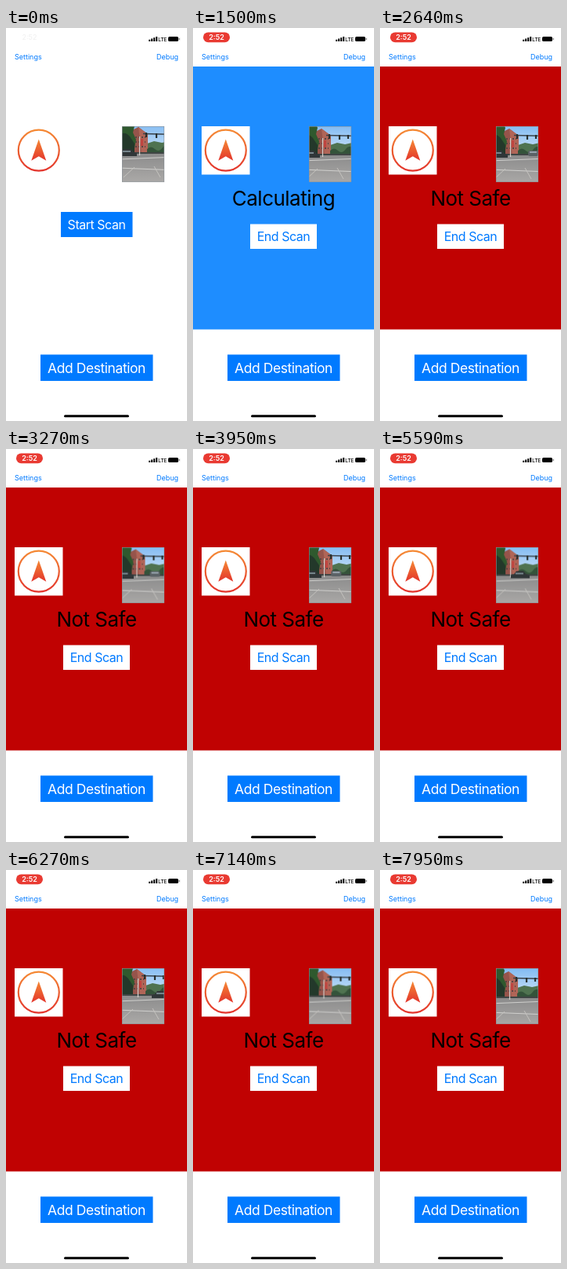
Write an HTML page that moves like this. It is 231 px wide and 500 px high and loops after 8000 ms.

```html
<!DOCTYPE html>
<html lang="en">
<head>
<meta charset="utf-8">
<title>Scan screen</title>
<style>
html, body { margin: 0; width: 100%; height: 100%; overflow: hidden; background: #fff; }
svg { display: block; width: 231px; height: 500px; font-family: Inter, Roboto, sans-serif; }
.mid { text-anchor: middle; }
.link, .end { fill: #007aff; }
.link { font-size: 9px; }
.button { fill: #007aff; }
.action { font-size: 16px; letter-spacing: -.03em; }
.state { font-size: 26px; letter-spacing: -.02em; }

.idle, .calculating, .unsafe, .scan, .pill, .camera, .car, .bus {
  animation: 8s linear infinite;
}
.idle { animation-name: idle; animation-timing-function: step-end; }
.scan { animation-name: scan; animation-timing-function: step-end; }
.calculating { animation-name: calculating; animation-timing-function: step-end; }
.unsafe { animation-name: unsafe; animation-timing-function: step-end; }
.pill { animation-name: pill; }
.camera { animation-name: camera; animation-timing-function: ease-in-out; }
.car { animation-name: car; }
.bus { animation-name: bus; }

@keyframes idle { 0% { opacity: 1 } 13%, 100% { opacity: 0 } }
@keyframes scan { 0% { opacity: 0 } 13%, 100% { opacity: 1 } }
@keyframes calculating { 0% { opacity: 0 } 13% { opacity: 1 } 25.5%, 100% { opacity: 0 } }
@keyframes unsafe { 0% { opacity: 0 } 25.5%, 100% { opacity: 1 } }
@keyframes pill { 0%, .7% { opacity: 0 } 4%, 100% { opacity: 1 } }
@keyframes camera {
  0% { transform: translate(5px, -2px) }
  19% { transform: translate(0, 0) }
  33% { transform: translate(1px, 0) }
  49% { transform: translate(2px, -1px) }
  61% { transform: translate(-1px, 1px) }
  78% { transform: translate(3px, -2px) }
  100% { transform: translate(0, 1px) }
}
@keyframes car {
  0%, 54% { transform: translateX(-34px) }
  61% { transform: translateX(-24px) }
  78% { transform: translateX(10px) }
  90%, 100% { transform: translateX(40px) }
}
@keyframes bus {
  0%, 24% { transform: translateX(32px) }
  33% { transform: translateX(16px) }
  49% { transform: translateX(4px) }
  60%, 100% { transform: translateX(-45px) }
}
</style>
</head>
<body>
<svg viewBox="0 0 231 500">
  <defs>
    <linearGradient id="ember" x1="0" y1="0" x2="0" y2="1">
      <stop offset="0" stop-color="#f58a35"/>
      <stop offset="1" stop-color="#e3342c"/>
    </linearGradient>
    <linearGradient id="sky" x1="0" y1="0" x2="0" y2="1">
      <stop offset="0" stop-color="#76b4f2"/>
      <stop offset="1" stop-color="#dcecf8"/>
    </linearGradient>
    <linearGradient id="road" x1="0" y1="0" x2="0" y2="1">
      <stop offset="0" stop-color="#8c8c8c"/>
      <stop offset="1" stop-color="#b0aeac"/>
    </linearGradient>
    <clipPath id="lens"><rect x="148" y="125" width="54" height="71"/></clipPath>
  </defs>

  <rect width="231" height="500" fill="#fff"/>

  <!-- Status bar -->
  <text class="mid" x="30" y="15.3" font-size="9" fill="#f0f0f0">2:52</text>
  <g class="pill">
    <rect x="13" y="5.5" width="34" height="12.7" rx="6.3" fill="#e93a32"/>
    <text class="mid" x="30" y="15.3" font-size="9" font-weight="600" fill="#fff">2:52</text>
  </g>
  <path d="M183.2 17v-2.3M186.2 17v-3.4M189.2 17v-4.7M192.2 17v-6" stroke="#000" stroke-width="2"/>
  <text x="194.3" y="16.9" font-size="6.6" font-weight="500" letter-spacing="-.2">LTE</text>
  <rect x="207" y="10.9" width="13" height="6.2" rx="1.7" fill="#000"/>
  <rect x="220.7" y="12.8" width="1.2" height="2.4" rx=".6" fill="#777"/>

  <text class="link" x="11" y="40.2">Settings</text>
  <text class="link" x="220" y="40.2" text-anchor="end">Debug</text>

  <!-- Scan panel -->
  <g class="calculating">
    <rect y="49" width="231" height="334.5" fill="#1e8dff"/>
    <text class="state mid" x="115.5" y="226">Calculating</text>
  </g>
  <g class="unsafe">
    <rect y="49" width="231" height="334.5" fill="#c00202"/>
    <text class="state mid" x="115.5" y="226">Not Safe</text>
  </g>
  <g class="idle">
    <rect class="button" x="70" y="234" width="91.5" height="32"/>
    <text class="action mid" x="115.5" y="256" fill="#fff">Start Scan</text>
  </g>
  <g class="scan">
    <rect x="11" y="125" width="61.5" height="61.5" fill="#fff"/>
    <rect x="73" y="249.5" width="85" height="31.5" fill="#fff"/>
    <text class="action end mid" x="115.5" y="271.3">End Scan</text>
  </g>

  <!-- Direction dial -->
  <circle cx="41.8" cy="155.6" r="26" fill="none" stroke="url(#ember)" stroke-width="2.2"/>
  <path d="M41.8 141.5L51.3 168.8L41.8 163.2L32.3 168.8Z" fill="url(#ember)"/>

  <!-- Camera view -->
  <g clip-path="url(#lens)">
    <g class="camera">
      <rect x="138" y="118" width="75" height="50" fill="url(#sky)"/>
      <path d="M175 149l9-3 10 2 18-4v20h-37z" fill="#4f7350"/>
      <path d="M152 134l12-6 12 9v25h-24z" fill="#96544b"/>
      <path d="M164 128l12 9v25h-8z" fill="#b06557"/>
      <path d="M156 141h17M156 147h17M156 153h17" stroke="#5b4544" stroke-width="2" stroke-dasharray="2 2"/>
      <path d="M138 118h17l4 9-2 8 4 9-3 17h-20z" fill="#2f592e"/>
      <path d="M138 139q8-7 15 1l6 9v13h-21z" fill="#23382a"/>
      <path d="M175 156q5-5 10 0t10-2 18 1v9h-38z" fill="#34533a"/>
      <path d="M138 160h75v3h-75z" fill="#3f4544"/>
      <rect x="138" y="162" width="75" height="42" fill="url(#road)"/>
      <path d="M138 169l75-3M138 180l75 3" stroke="#d0d0ce" stroke-width="1.2"/>
      <path d="M145 192l14-13M192 192l-8-14" stroke="#c5c3bf" stroke-width="1"/>
      <path d="M170 136.5l43 1" stroke="#39424a" stroke-width="1.3"/>
      <path d="M174 135v6M187 136v6M198 136v5" stroke="#28302e" stroke-width="2.2"/>
      <path d="M165.5 140v24" stroke="#d6d2ce" stroke-width="1.2"/>
      <rect x="167" y="143" width="3" height="9" fill="#c04540"/>
      <g class="bus">
        <rect x="172" y="156" width="13" height="7" rx="2" fill="#5b6266"/>
        <path d="M174 158h9" stroke="#a9b7c2" stroke-width="1.5"/>
      </g>
      <g class="car">
        <path d="M172 165v-4l4-1 3-4h9l4 4 4 1v4z" fill="#303638"/>
        <path d="M178 159h10" stroke="#8fa0aa" stroke-width="1.5"/>
      </g>
    </g>
  </g>
  <rect x="148.3" y="125.3" width="53.5" height="70.5" fill="none" stroke="#8b9298" stroke-width=".6"/>

  <!-- Footer -->
  <rect class="button" x="44" y="415.5" width="143.5" height="33.5"/>
  <text class="mid" x="115.5" y="439" font-size="17.5" letter-spacing="-.025em" fill="#fff">Add Destination</text>
  <rect x="74" y="492.2" width="83" height="3" rx="1.5" fill="#000"/>
</svg>
</body>
</html>
```
